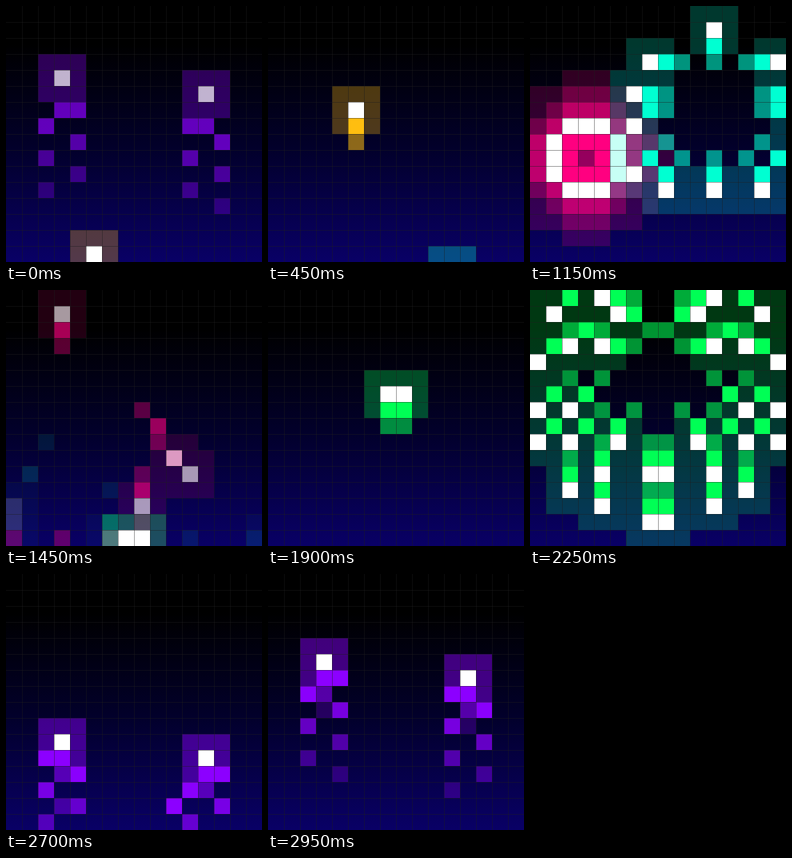
Write an HTML page with a canvas that moves like this. It is 320x320 px and loops after 3 s.

```html
<!DOCTYPE html>
<html lang="en">
<head>
<meta charset="utf-8">
<title>Pixel fireworks</title>
<style>
html, body { margin: 0; width: 100%; height: 100%; overflow: hidden; background: #000; }
canvas { display: block; width: 320px; height: 320px; }
</style>
</head>
<body>
<canvas id="sky" width="320" height="320"></canvas>
<script>
const ctx = document.getElementById('sky').getContext('2d');
const CELL = 20, STEP = 50, FRAMES = 60;
const WHITE = '255,255,255', VIOLET = '140,0,255';

const night = ctx.createLinearGradient(0, 0, 0, 320);
night.addColorStop(0, '#000');
night.addColorStop(0.15, '#000');
night.addColorStop(0.55, 'rgb(2,0,42)');
night.addColorStop(1, 'rgb(9,0,102)');

// Spark paths: x, y at the late age, then x, y two steps earlier.
const ring = {
  age: 6, fade: 6,
  sparks: [
    [0, -6, 0, -4], [5, -2, 3, -3], [6, 0, 4, -1], [5, 1.9, 4, 0.4],
    [5, 5, 4, 3], [3.4, 6, 2.55, 4], [0, 6, 0, 4]
  ]
};
const willow = {
  age: 7, fade: 9,
  sparks: [
    [7, -2, 5, -4], [6, -5, 4, -7], [7, 1, 5, -1], [7, 3, 5, 1],
    [5, 6, 5, 4], [3, 7, 3, 5], [0, 8, 0, 6],
    [2, -5, 0.4, -4], [3, -6, 1, -6], [3, -3, 1, -3], [5, -3, 3, -4],
    [5, 1, 3, -1], [5, 3, 3, 1], [2, 3, 1.2, 1], [3, 5, 3, 3], [0, 5, 0, 3]
  ]
};

// rise: row of the rocket at time 0; start: step at which it bursts.
const rockets = [
  { cols: [5], rise: 15, start: 9, row: 5, rgb: '255,190,16', shape: ring },
  { cols: [3], rise: 31, start: 21, row: 9, rgb: '255,0,128', shape: ring },
  { cols: [11], rise: 25, start: 18, row: 6, rgb: '0,255,210', shape: ring },
  { cols: [7, 8], rise: 44, start: 38, row: 6, rgb: '0,255,85', shape: willow }
];
const comets = [
  { col: 3, rise: 64, stop: 5 },
  { col: 12, rise: 65, stop: 6 }
];

function cell(x, y, rgb, alpha) {
  if (x < 0 || y < 0 || x > 15 || y > 15 || alpha <= 0) return;
  ctx.fillStyle = `rgba(${rgb},${alpha})`;
  ctx.fillRect(x * CELL, y * CELL, CELL, CELL);
}

// One flat 3x3 halo around every head; overlaps do not add up.
function halo(heads, rgb, alpha) {
  const seen = new Set();
  for (const [x, y] of heads)
    for (let i = -1; i < 2; i++)
      for (let j = -1; j < 2; j++) seen.add(`${x + i},${y + j}`);
  for (const key of seen) cell(...key.split(',').map(Number), rgb, alpha);
}

// Parabola from the origin through both given points.
function along(late, early, age, t) {
  const b = (late / age - early / (age - 2)) / 2;
  return Math.round((late / age - b * age) * t + b * t * t);
}

function places({ cols, row, shape }, t) {
  if (t < 0) return [];
  const left = cols[0], right = cols[cols.length - 1];
  return shape.sparks.flatMap(([x, y, ex, ey]) => {
    const dx = along(x, ex, shape.age, t);
    const cy = row + along(y, ey, shape.age, t);
    return [[left - dx, cy], [right + dx, cy]];
  });
}

// Each cell once, so mirrored sparks keep their strength.
function dots(list, rgb, alpha) {
  const unique = new Map(list.map(p => [p.join(), p]));
  for (const [x, y] of unique.values()) cell(x, y, rgb, alpha);
}

function flash({ cols, row, rgb }, t) {
  const left = cols[0], right = cols[cols.length - 1];
  for (let y = 0; y < 16; y++)
    for (let x = 0; x < 16; x++) {
      const dx = Math.max(left - x, 0, x - right);
      const d = Math.hypot(dx, y - row) - t;
      if (d < 0.3) continue;
      cell(x, y, rgb, d < 1.3 ? 0.74 : d < 2.2 ? 0.43 : d < 3.2 ? 0.19 : 0);
    }
}

function drawRocket(r, f) {
  const t = f - r.start;
  if (t <= 0) {
    const y = r.rise - f;
    if (y > 17) return;
    halo(r.cols.map(x => [x, y]), r.rgb, 0.3);
    for (const x of r.cols) {
      cell(x, y, WHITE, 1);
      cell(x, y + 1, r.rgb, 1);
      cell(x, y + 2, r.rgb, 0.55);
      if (f % 4 === 3) cell(x, y + 4, r.rgb, 0.2);
    }
    return;
  }
  const late = t - r.shape.fade;
  const power = late < 0 ? 1 : 0.9 - 0.15 * late;
  if (power < 0.01) return;
  const heads = places(r, t);
  if (t < 3) flash(r, t);
  else halo(heads, r.rgb, 0.22 * power);
  dots(places(r, t - 2), r.rgb, 0.58 * power);
  dots(places(r, t - 1), r.rgb, power);
  dots(heads, WHITE, power);
}

function drawComet({ col, rise, stop }, f) {
  const y = rise - f, over = Math.max(0, f - 59);
  const power = [1, 0.7, 0.4, 0.15][over] || 0;
  if (y > 17 || !power) return;
  const base = Math.max(y, stop);
  halo([[col, y]], VIOLET, 0.46 * power);
  for (let n = 1; n <= 7 - over; n++) {
    const row = base + n, side = row % 2 ? -1 : 1;
    cell(col + side, row, VIOLET, power * Math.min(1, 1.27 - 0.14 * n));
  }
  cell(col, base + 1, VIOLET, power);
  if (!over) {
    cell(col, base + 2, VIOLET, 0.6);
    if (f % 5 === 4 && f > 55) cell(col, base + 3, VIOLET, 0.25);
  }
  cell(col, y, WHITE, power);
}

function drawGrid() {
  ctx.fillStyle = 'rgba(30,30,30,.4)';
  for (let p = CELL; p < 320; p += CELL) {
    ctx.fillRect(p, 0, 1, 320);
    ctx.fillRect(0, p, 320, 1);
  }
}

function draw(f) {
  ctx.fillStyle = night;
  ctx.fillRect(0, 0, 320, 320);
  for (const r of rockets) drawRocket(r, f);
  // Comets carry over the loop point.
  for (const c of comets) drawComet(c, f < 10 ? f + FRAMES : f);
  if (f > 52 && f < 56) {
    const glow = 1 - 0.3 * Math.abs(f - 54);
    cell(10, 14, VIOLET, glow);
    cell(3, 14, VIOLET, 0.45 * glow);
  }
  drawGrid();
}

const begin = performance.now();
let shown = -1;
function tick() {
  const f = Math.floor(Math.max(0, performance.now() - begin) / STEP) % FRAMES;
  if (f !== shown) draw(shown = f);
  requestAnimationFrame(tick);
}
tick();
</script>
</body>
</html>
```
